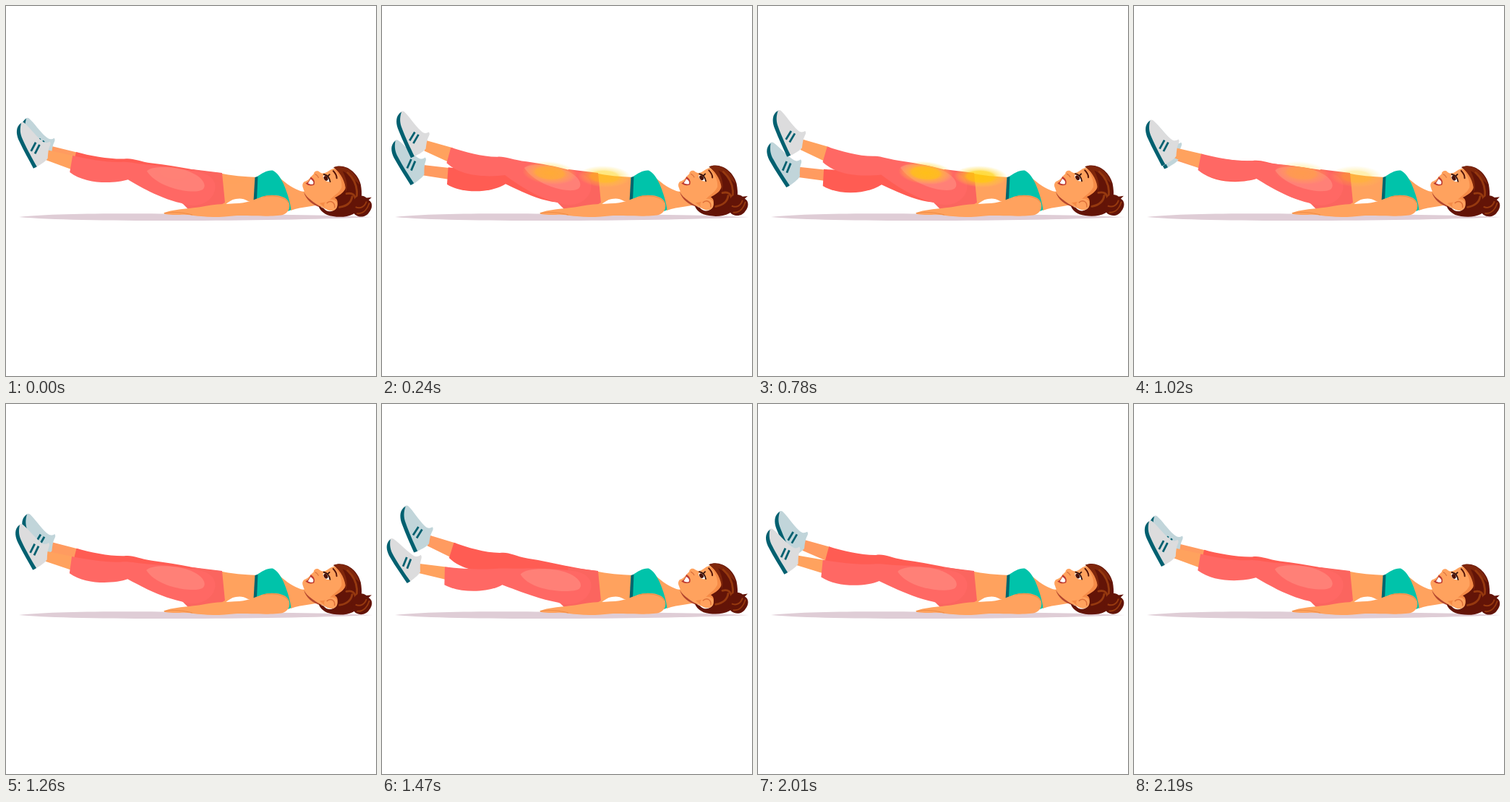
These frames come from a looping animation (512 px wide and 512 px high, 2220 ms). An HTML page:

```html
<!DOCTYPE html>
<html lang="en">
<head>
<meta charset="utf-8">
<title>Flutter kicks</title>
<style>
  html, body { margin: 0; width: 100%; height: 100%; overflow: hidden; background: #fff; }
  svg { display: block; width: 100vw; height: 100vh; }
  .skin { fill: #ffa25e; }
</style>
</head>
<body>
<svg viewBox="0 0 512 512">
  <defs>
    <radialGradient id="heat">
      <stop offset="0" stop-color="#ffd000"/>
      <stop offset=".5" stop-color="#ffd008" stop-opacity=".92"/>
      <stop offset=".62" stop-color="#ffd21c" stop-opacity=".6"/>
      <stop offset=".82" stop-color="#ffd834" stop-opacity=".32"/>
      <stop offset="1" stop-color="#ffe04a" stop-opacity="0"/>
    </radialGradient>
    <g id="shoe">
      <path d="M26 142C28 138 32 137 34 139C41 146 47 157 56 166C60 170 63 170 67 168C68 170 68 171 67 173C64 178 63 184 62 191C58 196 50 199 43 203C36 190 24 165 23 150C23 146 24 144 26 142Z"/>
      <path fill="#006070" d="M27 141C21 147 22 156 25 164C30 178 36 191 41 203L46 201C41 190 34 174 30 162C27 154 27 147 30 139Z"/>
      <path fill="none" stroke="#006070" stroke-width="2.800" d="M40 179L47.500 167.500M45 183L52.500 171"/>
    </g>
  </defs>

  <path fill="#dfcdd6" d="M18 292C70 286 190 287 263 288C380 288 460 290 508 292C450 295 330 297 230 297C140 297 60 296 18 292Z"/>

  <g id="far">
    <path class="ankle" fill="#ff9b60"/>
    <path class="leg" fill="#ff5c53"/>
    <use class="foot" href="#shoe" fill="#c1d5da"/>
  </g>

  <path class="skin" d="M294 231C312 235 330 236 348 237L350 270L335 270C329 266 323 266 318 267C312 268 308 271 303 275L290 276Z"/>
  <path fill="#fb655f" d="M258 226L299 231L303 272C290 279 282 290 264 290C254 284 248 277 244 273Z"/>

  <g id="near">
    <path class="ankle skin"/>
    <path class="leg" fill="#ff6864"/>
    <path class="shine" fill="#ff8077"/>
    <use class="foot" href="#shoe" fill="#dcdcdd"/>
  </g>

  <path class="skin" d="M374 234C385 243 394 251 405 255C409 257 412 257 414 256L440 272C430 278 410 277 394 283C388 270 383 250 374 234Z"/>
  <path fill="#00c3aa" d="M346 237C355 231 361 227 369 227.500C376 231 380 238 384 246C389 258 393 270 394.500 282L390.500 284L386 268L344 270Z"/>
  <path fill="#00666e" d="M344.500 237L348.500 236L347 270L342.500 270Z"/>
  <path class="skin" d="M392 274C391 266 380 261 365 262C354 262 347 268 334 271C320 275 300 272 275 277C255 281 235 280 219 286C216 288 225 289 240 289C252 288 258 290 270 291C285 293 300 292 320 290C340 290 370 292 383 289C391 286 393 280 392 274Z"/>
  <path fill="none" stroke="#ee8b45" stroke-width="1" d="M356 264C368 261 386 263 391 272M219 287C232 284 246 286 258 289"/>

  <g id="head">
    <path fill="#b4472f" d="M412 257C417 267 428 272 440 274L436 278C425 275 415 268 412 257Z"/>
    <path class="skin" d="M412 243C416 242 419 239 421 236L425 232C425 228 430 226 433 229C437 232 441 231 446 227C450 224 455 222 462 223L474 250L458 279L446 281C430 275 415 266 411 252C409 248 410 245 412 243Z"/>
    <path fill="#f58b47" d="M454 226C461 232 465 242 464 250C460 259 451 262 446 270L434 272L446 281L460 276L474 250L464 226Z"/>
    <path fill="#631407" d="M452 222C468 215 486 228 490.500 245C494 262 492 278 481 286C470 292 455 291 445 288C438 285 434 280 433 276L440 279C444 284 452 285 457 279C460 273 460 266 455 264C462 260 469 256 470 248C469 238 461 228 452 222Z"/>
    <path fill="#7f260b" d="M453 222C469 216 485 230 489 245C480 238 475 231 465 227C471 238 473 248 470 256C470 242 463 231 453 222Z"/>
    <g fill="none" stroke="#96390f" stroke-width="2.800" stroke-linecap="round">
      <path d="M472 229C483 239 487 251 485 264M471 258C479 256 483 259 484 267M462 277C472 275 478 270 479 262"/>
    </g>
    <path fill="#631407" d="M482 266C486 259 494 259 499 263L506 262L502 266C508 269 508 277 503 283C499 290 490 291 484 287C478 282 478 273 482 266Z"/>
    <path fill="none" stroke="#96390f" stroke-width="2" d="M486 285C496 286 501 277 503 270M484 276C491 279 497 275 499 268"/>
    <path class="skin" d="M441 272C445 265 455 265 458 270C461 277 456 283 449 282C443 281 439 277 441 272Z"/>
    <path fill="none" stroke="#dd6f38" stroke-width="1.500" d="M444 272C449 267 456 270 455 278"/>
    <path fill="#bd3a30" d="M421 236C425 238 428 242 426 247C421 249 417 248 414 245C418 244 420 240 421 236Z"/>
    <path fill="#fff" d="M421 239C424 241 426 243 424.500 246C422 247 419 246 417.500 245Z"/>
    <path fill="none" stroke="#d9703d" stroke-width="1.200" d="M427 232C429 233 431 234 432 237"/>
    <path fill="#fff" d="M438 234C443 233 448 237 448 242C442 243 438 239 438 234Z"/>
    <ellipse cx="442" cy="237.500" rx="2.600" ry="3.600" transform="rotate(-35 442 237.500)" fill="#4a1208"/>
    <path fill="none" stroke="#35100b" stroke-width="1.800" stroke-linecap="round" d="M439 232C444 233 447 237 448 242M445 234L447 232"/>
    <path fill="none" stroke="#59170a" stroke-width="2" stroke-linecap="round" d="M452 227C455 230 457 233 457 237"/>
  </g>

  <g id="glow" fill="url(#heat)">
    <ellipse cx="232" cy="231" rx="38" ry="16" transform="rotate(5 232 231)"/>
    <ellipse cx="308" cy="236" rx="37" ry="15" transform="rotate(2 308 236)"/>
  </g>
</svg>

<script>
const LOOP = 2220;

// Each part has a raised and a lowered pose; foot is [x, y, angle].
const LIMBS = {
  near: {
    rest: 0.44,
    leg: [
      "M97 190C115 197 140 205 160 205C168 204 180 210 200 213C225 217 246 223 262 227C285 231 292 243 289 254C285 270 266 281 241 271C215 264 190 247 171 231C150 232 112 233 90 211Z",
      "M86 229C110 231 140 232 160 230C172 229 185 230 200 229C225 228 246 229 262 231C285 233 292 245 289 256C285 272 266 282 244 275C215 270 190 260 166 252C150 263 110 266 86 254Z"
    ],
    ankle: ["M62 179L100 191L93 211L60 194Z", "M51 225L90 229L88 246L50 238Z"],
    shine: [
      "M198 222C205 214 243 219 258 228C272 235 278 246 272 252C262 260 216 248 198 222Z",
      "M191 237C198 227 238 227 256 234C272 240 279 250 273 256C262 263 205 261 191 237Z"
    ],
    foot: [[0, 0, 0], [-7, 49, -12]]
  },
  far: {
    rest: 0.27,
    leg: [
      "M100 190C118 197 143 205 163 205C175 203 182 209 202 213C235 218 262 227 297 231L300 270C288 275 280 280 264 280C254 278 248 275 241 271C215 264 190 247 171 231C150 232 114 232 93 211Z",
      "M89 234C112 235 145 231 165 229C177 228 185 230 202 230C235 230 262 231 297 232L300 270C288 275 280 280 264 280C254 278 250 277 243 272C215 270 195 260 171 251C150 268 110 269 89 258Z"
    ],
    ankle: ["M65 179L103 191L96 211L63 194Z", "M55 233L92 235L90 249L54 247Z"],
    foot: [[3.5, 0, 0], [-3, 59, -12]]
  }
};

const byId = id => document.getElementById(id);
const lerp = (a, b, k) => a + (b - a) * k;

function morph([from, to], k) {
  const ends = to.match(/[\d.]+/g);
  let i = 0;
  return from.replace(/[\d.]+/g, n => lerp(+n, +ends[i++], k).toFixed(2));
}

function ramp(t, start, end) {
  return Math.min(1, Math.max(0, (t - start) / (end - start)));
}

// Halfway between smoothstep and quadratic ease-out.
function ease(t, start, end) {
  const x = ramp(t, start, end);
  return (x * x * (3 - 2 * x) + x * (2 - x)) / 2;
}

function poseLimb(id, lowered) {
  const limb = LIMBS[id], group = byId(id);
  for (const part of ["ankle", "leg", "shine"]) {
    if (limb[part]) group.querySelector("." + part).setAttribute("d", morph(limb[part], lowered));
  }
  const [x, y, angle] = limb.foot[0].map((v, i) => lerp(v, limb.foot[1][i], lowered));
  group.querySelector(".foot").setAttribute("transform", `translate(${x} ${y}) rotate(${angle} 43 203)`);
}

// spread: 1 = near leg raised, 0 = legs together, -1 = far leg raised
function render(t) {
  const spread = ease(t, 0, 450) - ease(t, 670, 1170)
    - ease(t, 1200, 1590) + ease(t, 1815, LOOP);
  const { near, far } = LIMBS;
  const amount = Math.abs(spread);
  poseLimb("near", lerp(near.rest, spread > 0 ? 0 : 1, amount));
  poseLimb("far", lerp(far.rest, spread > 0 ? 1 : 0, amount));
  byId("head").setAttribute("transform", `rotate(${1.5 * (1 - amount)} 405 262)`);
  byId("glow").setAttribute("opacity", ramp(t, 0, 450) - ramp(t, 670, 1200));
}

function tick() {
  render(performance.now() % LOOP);
  requestAnimationFrame(tick);
}
tick();
</script>
</body>
</html>
```
